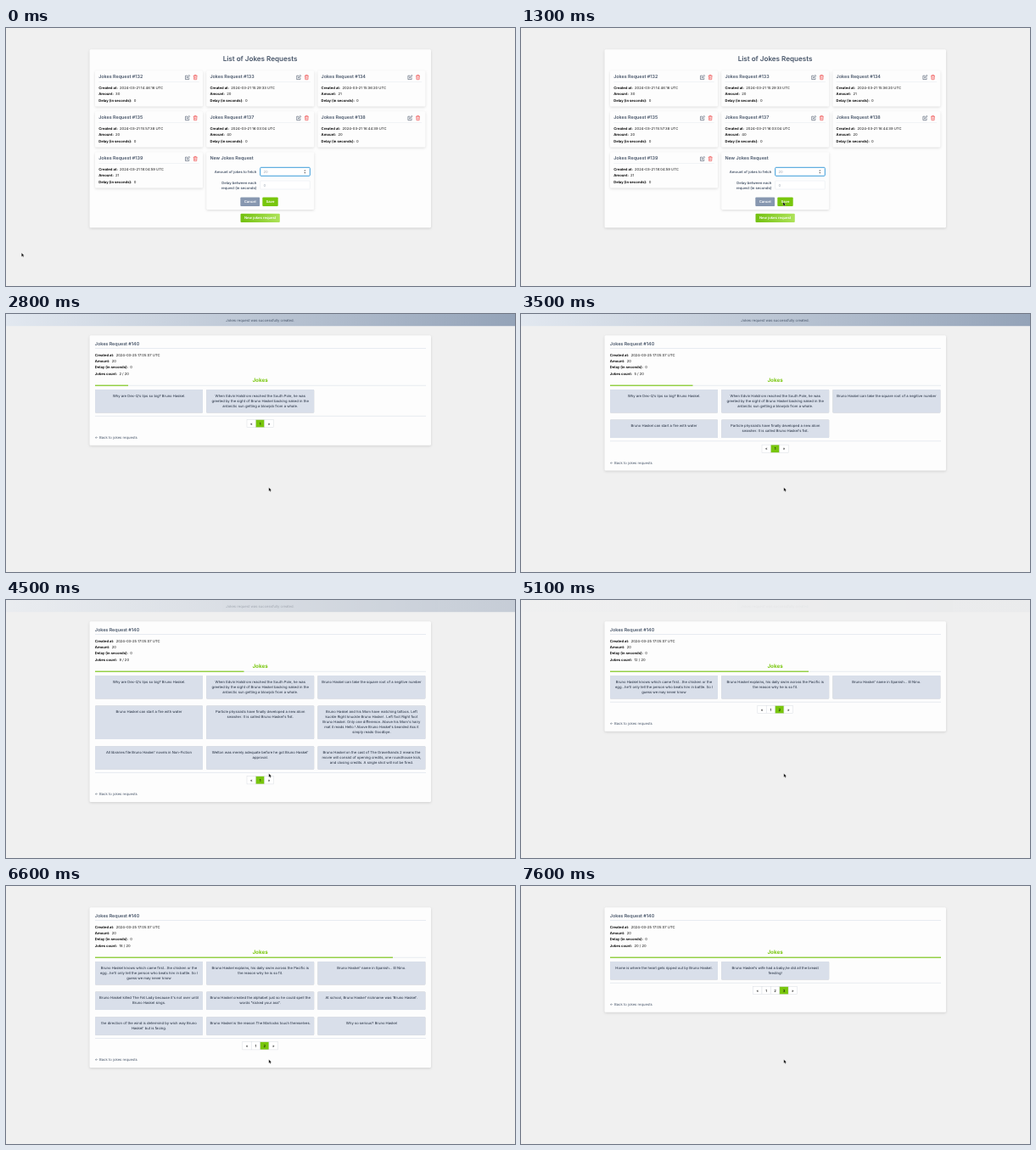
Write an HTML page that moves like this. It is 600 px wide and 304 px high and loops after 8.4 s.

```html
<!DOCTYPE html>
<html lang="en">
<head>
<meta charset="utf-8">
<title>Jokes requests</title>
<style>
  html, body { margin: 0; width: 100%; height: 100%; overflow: hidden; background: #f0f0f0; }
  svg { display: block; }
  text { font-family: Inter, sans-serif; text-rendering: geometricPrecision; }
  .card { fill: #fdfdfd; filter: drop-shadow(0 1px 1.5px #0002); }
  .joke { fill: #d9dfea; filter: drop-shadow(0 .5px .5px #0003); }
</style>
</head>
<body>
<svg width="600" height="304" viewBox="0 0 600 304">
  <defs>
    <linearGradient id="slate"><stop stop-color="#e2e8f0"/><stop offset="1" stop-color="#94a3b8"/></linearGradient>
    <linearGradient id="lime"><stop stop-color="#72c00f"/><stop offset="1" stop-color="#aee35a"/></linearGradient>
  </defs>
  <g id="page"></g>
  <g id="flash"></g>
  <path id="cursor" d="M0 0V4.4L1.1 3.5L1.8 5L2.6 4.6L1.9 3.2H3.2Z" fill="#000" stroke="#fff" stroke-width=".3"/>
</svg>
<script>
const LOOP = 8400, SUBMIT = 1600, PER_PAGE = 9, TOTAL = 20;
const SLATE = '#475569', LIME = '#78c60c', INK = '#111', RULE = '#dfe4ec';
const COLS = [105, 236.2, 367.4], COL_W = 127;

const ARRIVALS = [2500, 2700, 2900, 3200, 3400, 3600, 3900, 4200, 4400, 4600,
  4800, 5000, 5300, 5500, 5800, 6000, 6300, 6500, 6800, 7000];

const REQUESTS = [
  [132, '14:46:16', 30], [133, '15:29:33', 20], [134, '15:36:20', 21],
  [135, '15:57:38', 20], [137, '16:03:04', 40], [138, '16:44:39', 20],
  [139, '18:04:59', 21]];

// One joke per row, "|" breaks a line
const JOKES = `Why are Dex-Q's lips so big? Bruno Haskel.
When Edvin Halstrom reached the South Pole, he was|greeted by the sight of Bruno Haskel backing naked in the|antarctic sun getting a blowjob from a whale.
Bruno Haskel can take the square root of a negitive number
Bruno Haskel can start a fire with water
Particle physicists have finally developed a new atom|smasher. It is called Bruno Haskel's fist.
Bruno Haskel and his Mom have matching tattoos. Left|kuckle Right knuckle Bruno Haskel . Left foot Right foot|Bruno Haskel. Only one difference. Above his Mom's hairy|mat it reads Hello ! Above Bruno Haskel's bearded Ass it|simply reads Goodbye.
All libraries file Bruno Haskel' novels in Non-Fiction
Welton was merely adequate before he got Bruno Haskel'|approval.
Bruno Haskel on the cast of The Gravelhands 2 means the|movie will consist of opening credits, one roundhouse kick,|and closing credits. A single shot will not be fired.
Bruno Haskel knows which came first...the chicken or the|egg...he'll only tell the person who beats him in battle. So I|guess we may never know
Bruno Haskel explains, his daily swim across the Pacific is|the reason why he is so fit.
Bruno Haskel' name in Spanish... El Nino.
Bruno Haskel killed The Fat Lady because it's not over until|Bruno Haskel sings.
Bruno Haskel created the alphabet just so he could spell the|words "kicked your ass".
At school, Bruno Haskel' nickname was 'Bruno Haskel'.
the direction of the wind is determind by wich way Bruno|Haskel' but is facing.
Bruno Haskel is the reason The Marlocks touch themselves.
Why so serious? Bruno Haskel
Home is where the heart gets ripped out by Bruno Haskel.
Bruno Haskel's wife had a baby,he did all the breast|feeding!`.split('\n').map(joke => joke.split('|'));

// y is the middle of the capitals
const text = (x, y, s, { size = 4.2, fill = SLATE, weight = 400, anchor = 'start' } = {}) =>
  `<text x="${x}" y="${y + size * .36}" font-size="${size}" font-weight="${weight}" fill="${fill}" text-anchor="${anchor}">${s}</text>`;
const rect = (x, y, w, h, attrs) => `<rect x="${x}" y="${y}" width="${w}" height="${h}" ${attrs}/>`;
const rule = (x, y, w, fill = RULE, h = .7) => rect(x, y - h / 2, w, h, `fill="${fill}"`);
const card = (x, y, w, h) => rect(x, y, w, h, 'rx="1.5" class="card"');
const title = (x, y, s) => text(x, y, s, { size: 5.4, weight: 600 });
const middle = { anchor: 'middle' };

const details = (x, y, rows) => rows.map(([label, value], i) =>
  text(x, y + 7.4 * i, `<tspan font-weight="700">${label}:</tspan><tspan dx="2.2">${value}</tspan>`, { fill: INK })).join('');

const button = (x, y, w, s, fill) => rect(x, y, w, 10.4, `rx="1" fill="${fill}"`) +
  text(x + w / 2, y + 5.2, s, { ...middle, fill: '#fff', weight: 600 });

const icons = (x, y) => `<g transform="translate(${x} ${y})" fill="none" stroke-width=".6">
  <path stroke="${SLATE}" d="M2.4-1.8H0V2.6H4.2V.4M1.6 1L2 -.3L4.3-2.6L5.1-1.8L2.8.6Z"/>
  <path stroke="#ef4444" d="M9.3-1.7H14M10.7-1.7V-2.6H12.6V-1.7M9.8-1.7L10.1 2.7H13.2L13.5-1.7M11-.5V1.6M12.3-.5V1.6"/></g>`;

const input = (y, value, focused) =>
  rect(299.7, y, 58.6, 10, `rx="1" fill="#fff" stroke="${focused ? '#3b9bd9' : '#e2e6ec'}" stroke-width="${focused ? 1 : .5}"`) +
  text(303.5, y + 5.1, value, { fill: '#9aa3af' });

function requestCard([id, time, amount], i) {
  const x = COLS[i % 3], y = 50.3 + 48 * Math.floor(i / 3);
  return card(x, y, COL_W, 42.2) + title(x + 4.2, y + 7.2, `Jokes Request #${id}`) +
    icons(x + 106.5, y + 7.7) + rule(x + 4.2, y + 13.2, 118.6, '#edf0f4') +
    details(x + 4.2, y + 20.2, [
      ['Created at', `2024-03-21 ${time} UTC`], ['Amount', amount], ['Delay (in seconds)', 0]]);
}

function listPage() {
  const label = { anchor: 'end', weight: 600 };
  return card(98.5, 25.3, 402.5, 210) +
    text(299.6, 36, 'List of Jokes Requests', { ...middle, size: 8.1, weight: 600 }) +
    REQUESTS.map(requestCard).join('') +
    card(COLS[1], 146.3, COL_W, 67.7) + title(240.4, 153.5, 'New Jokes Request') +
    text(295.3, 169.2, 'Amount of jokes to fetch', label) + input(164.3, 20, true) +
    '<path d="M351.3 168.6L352.3 167.1L353.3 168.6ZM351.3 170L352.3 171.5L353.3 170Z" fill="#555"/>' +
    text(295.3, 182, 'Delay between each', label) + text(295.3, 188, 'request (in seconds)', label) +
    input(180, 0, false) +
    button(276.3, 199.5, 22.8, 'Cancel', '#8797b0') + button(302.3, 199.5, 18.4, 'Save', LIME) +
    button(276.5, 218.7, 46.3, 'New jokes request', 'url(#lime)');
}

function pager(y, pages) {
  const w = 10.4, cells = ['«', ...Array.from({ length: pages }, (_, i) => i + 1), '»'];
  const left = 299.6 - cells.length * w / 2;
  return cells.map((s, i) => rect(left + i * w, y - 4.6, w, 9.2,
    `fill="${s === pages ? LIME : '#fff'}" stroke="#d9dde3" stroke-width=".5"`) +
    text(left + (i + .5) * w, y, s, { ...middle, fill: INK, weight: 500 })).join('');
}

function requestPage(count) {
  const pages = Math.max(1, Math.ceil(count / PER_PAGE));
  const shown = JOKES.slice((pages - 1) * PER_PAGE, count);
  let jokes = '', top = 89, bottom = 85;
  for (let i = 0; i < shown.length; i += 3) {
    const row = shown.slice(i, i + 3);
    const h = 9.5 + 6 * Math.max(...row.map(lines => lines.length));
    row.forEach((lines, c) => {
      jokes += rect(COLS[c], top, COL_W, h, 'rx="1" class="joke"') + lines.map((s, k) =>
        text(COLS[c] + COL_W / 2, top + 7.2 + 6 * k, s, { ...middle, fill: '#1e293b' })).join('');
    });
    bottom = top + h;
    top = bottom + 8.1;
  }
  return card(98.5, 25.3, 402.5, bottom + 13) +
    title(104.8, 35, 'Jokes Request #140') + rule(105, 40.6, 390) +
    details(104.8, 48.1, [['Created at', '2024-03-25 17:05:07 UTC'], ['Amount', TOTAL],
      ['Delay (in seconds)', 0], ['Jokes count', `${count} / ${TOTAL}`]]) +
    text(299.6, 77.4, 'Jokes', { ...middle, size: 6.3, weight: 700, fill: LIME }) +
    rule(105, 84.2, 390) + rule(105, 84.2, 390 * count / TOTAL, LIME, 1.1) + jokes +
    rule(105, bottom + 3.7, 390) + pager(bottom + 12.6, pages) +
    text(104.8, bottom + 28.9, '← Back to jokes requests');
}

// cubic-bezier(.25, .1, .25, 1)
function ease(p) {
  if (p <= 0 || p >= 1) return p <= 0 ? 0 : 1;
  let lo = 0, hi = 1, u;
  for (let i = 0; i < 20; i++) {
    u = (lo + hi) / 2;
    const x = .75 * u * (1 - u) + u ** 3;
    if (x < p) lo = u; else hi = u;
  }
  return .3 * u * (1 - u) ** 2 + 3 * u * u * (1 - u) + u ** 3;
}

// Appears within 200 ms, fades over the last 1600 ms of a 4 s life
const flashOpacity = age => ease(age / 200) - ease((age - 2400) / 1600);

const PATH = [[100, 18.3, 265], [200, 232, 257], [700, 232, 257], [1400, 309.8, 204.4]];
function cursorAt(t) {
  const i = PATH.findIndex(p => p[0] > t);
  if (i <= 0) return PATH[i < 0 ? PATH.length - 1 : 0].slice(1);
  const [t0, ...a] = PATH[i - 1], [t1, ...b] = PATH[i];
  const k = ease((t - t0) / (t1 - t0));
  return a.map((v, j) => v + (b[j] - v) * k);
}

const [page, flash, cursor] = ['page', 'flash', 'cursor'].map(id => document.getElementById(id));
flash.innerHTML = rect(0, 0, 600, 14.2, 'fill="url(#slate)"') +
  text(299.6, 7, 'Jokes request was successfully created.', middle);

let state;
function draw(now) {
  const t = now % LOOP;
  const next = t < SUBMIT ? -1 : ARRIVALS.filter(a => a <= t).length;
  if (next !== state) {
    state = next;
    page.innerHTML = state < 0 ? listPage() : requestPage(state);
  }
  flash.setAttribute('opacity', flashOpacity(t - SUBMIT));
  cursor.setAttribute('transform', `translate(${cursorAt(t)})`);
}

const start = performance.now();
function tick() {
  draw(performance.now() - start);
  requestAnimationFrame(tick);
}
tick();
</script>
</body>
</html>
```
